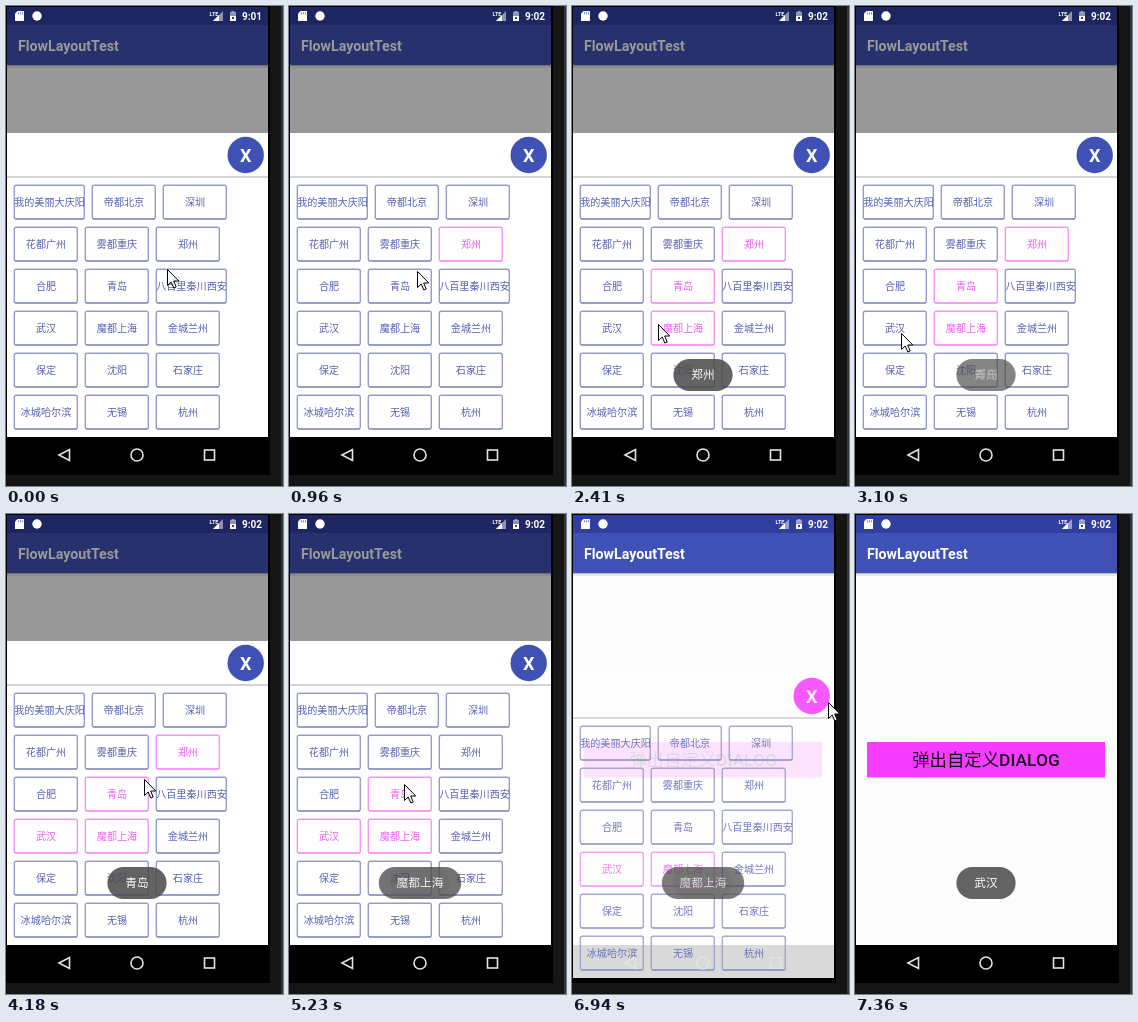
Animation, 277 px wide and 480 px high, one loop 7790 ms. Source, as an HTML page with a canvas:

```html
<!DOCTYPE html>
<html lang="zh-CN">
<head>
<meta charset="utf-8">
<title>FlowLayoutTest</title>
<style>
html, body { margin: 0; width: 100%; height: 100%; overflow: hidden; background: #151515; }
canvas { display: block; }
</style>
</head>
<body>
<canvas id="stage" width="277" height="480"></canvas>
<script>
const ctx = document.getElementById('stage').getContext('2d');
const LOOP = 7790, STEP = 133;
const FONT = 'Roboto, "Noto Sans CJK SC", "Noto Sans CJK", sans-serif';
const BLUE = '#3f51b5', PINK = '#f53cff';
const SCREEN = { x: 1, w: 261, nav: 431, bottom: 468 };
const CLOSE_AT = 6840;

// When each tag is picked, and dropped again
const PICKED = {
  郑州: [600, 4500], 青岛: [1250, 5450], 魔都上海: [2250], 武汉: [3300]
};

// Toasts queue up, each fading in while the one before fades out
const TOAST = { first: 970, every: 1965, fade: 320 };
const toasts = ['郑州', '青岛', '魔都上海', '武汉'];

// Pointer stops: arrival time, x, y
const STOPS = [
  [0, 161, 263], [500, 181, 238], [1110, 114, 272], [1600, 99, 315], [2800, 46, 327], [4350, 181, 236],
  [4750, 235, 212], [5187, 115, 270], [6300, 246, 147], [6700, 246, 147], [6916, 256, 188], [7150, 282, 222]
];
const MOVE = 600;

const clamp = v => Math.max(0, Math.min(1, v));
const ramp = (t, a, b) => clamp((t - a) / (b - a));
const smooth = k => k * k * (3 - 2 * k);
const mix = (a, b, k) => Math.round(a + (b - a) * k);

// Flow layout: fill a line, wrap when the next tag does not fit
function flow(names) {
  let x = 8, y = 179;
  return names.map(name => {
    const w = Math.max(64, name.length * 10 + 1);
    if (x + w > 255) { x = 8; y += 42; }
    const tag = { name, x, y, w };
    x += w + 7;
    return tag;
  });
}

const tags = flow(('我的美丽大庆阳 帝都北京 深圳 花都广州 雾都重庆 郑州 合肥 青岛 八百里秦川西安 ' +
  '武汉 魔都上海 金城兰州 保定 沈阳 石家庄 冰城哈尔滨 无锡 杭州').split(' '));

function rect(x, y, w, h, color) {
  ctx.fillStyle = color;
  ctx.fillRect(x, y, w, h);
}

function text(s, x, y, size, color, weight = 400, align = 'center') {
  ctx.font = `${weight} ${size}px ${FONT}`;
  ctx.textAlign = align;
  ctx.fillStyle = color;
  ctx.fillText(s, x, y);
}

function poly(points, fill, stroke, width = 1) {
  ctx.beginPath();
  points.forEach(([x, y]) => ctx.lineTo(x, y));
  ctx.closePath();
  if (fill) { ctx.fillStyle = fill; ctx.fill(); }
  if (stroke) { ctx.strokeStyle = stroke; ctx.lineWidth = width; ctx.stroke(); }
}

function disc(x, y, r, color) {
  ctx.beginPath();
  ctx.arc(x, y, r, 0, Math.PI * 2);
  ctx.fillStyle = color;
  ctx.fill();
}

function drawBezel() {
  rect(0, 0, 277, 480, '#151515');
  rect(0, 0, 264, 469, '#000');
  rect(275, 0, 2, 480, '#363636');
}

function drawPage(dim) {
  const { x, w, nav } = SCREEN;
  rect(x, 1, w, nav - 1, '#fcfcfc');
  rect(x, 59, w, 1, 'rgba(0,0,0,.25)');
  rect(x, 60, w, 2, 'rgba(0,0,0,.08)');
  rect(x, 1, w, 18, '#303f9f');
  rect(x, 19, w, 40, BLUE);
  text('FlowLayoutTest', 12, 45, 14.2, '#fff', 700, 'left');
  rect(12, 263, 238, 1.5, 'rgba(0,0,0,.2)');
  rect(12, 228, 238, 35, PINK);
  text('弹出自定义DIALOG', 131, 252, 17.4, '#1c1020', 500);
  if (dim) rect(x, 1, w, nav - 1, 'rgba(0,0,0,.4)');
}

function drawTag({ name, x, y, w }, t) {
  const [from, to] = PICKED[name] || [LOOP];
  const on = t >= from && !(t >= to);
  ctx.beginPath();
  ctx.roundRect(x + .3, y + .3, w - 1, 33.7, 2);
  ctx.strokeStyle = on ? '#f595f8' : '#959ccb';
  ctx.lineWidth = 1.4;
  ctx.stroke();
  rect(x + 1, y + 33.5, w - 2, 1, on ? 'rgba(240,90,245,.4)' : 'rgba(60,70,140,.4)');
  text(name, x + w / 2, y + 21.3, 10.1, on ? '#f45cfa' : '#5560b0');
}

function drawDialog(t) {
  const { x, w, nav, bottom } = SCREEN;
  const p = ramp(t, CLOSE_AT, CLOSE_AT + 220) ** 2;
  if (p >= 1) return;
  ctx.save();
  ctx.beginPath();
  ctx.rect(x, 1, w, bottom - 1);
  ctx.clip();
  ctx.translate(0, Math.round(277 * p));
  ctx.globalAlpha = clamp(1 - 1.25 * p);
  rect(x, 127, w, nav - 127, '#fff');
  rect(x, 170.5, w, 1, '#a8a8a8');
  disc(239.7, 149, 18.2, t >= 6550 ? PINK : BLUE);
  text('X', 239.7, 156, 18, '#fff', 700);
  tags.forEach(tag => drawTag(tag, t));
  ctx.restore();
}

function drawSystem(t) {
  poly([[11.5, 5], [18, 5], [18, 15], [9, 15], [9, 7.5]], '#fff');
  for (let x = 12; x < 17; x += 2) rect(x, 6.3, .8, 2, '#56619a');
  disc(31, 10, 4.7, '#fff');
  text('LTE', 208, 9.5, 5.5, '#fff', 700);
  poly([[217, 5], [217, 15], [207, 15]], 'rgba(255,255,255,.5)');
  poly([[213, 9], [213, 15], [207, 15]], '#fff');
  rect(225.5, 5, 3, 1.5, 'rgba(255,255,255,.5)');
  rect(224, 6, 6, 4, 'rgba(255,255,255,.5)');
  rect(224, 10, 6, 5, '#fff');
  rect(226, 11, 2, 2, '#303f9f');
  text(t < 600 ? '9:01' : '9:02', 256, 14, 10, '#fff', 700, 'right');

  poly([[53, 449], [63.5, 443.5], [63.5, 454.5]], null, '#e4e4e4', 1.6);
  ctx.beginPath();
  ctx.arc(131, 449, 6, 0, Math.PI * 2);
  ctx.stroke();
  ctx.strokeRect(198.5, 444, 10, 10);
}

function drawToast(s, i, t) {
  const start = TOAST.first + TOAST.every * i, end = start + TOAST.every;
  const alpha = ramp(t, start, start + TOAST.fade) * (1 - ramp(t, end, end + TOAST.fade));
  if (!alpha) return;
  const w = 36 + 11.6 * s.length;
  ctx.save();
  ctx.globalAlpha = alpha;
  ctx.beginPath();
  ctx.roundRect(131 - w / 2, 353, w, 32, 16);
  ctx.fillStyle = 'rgba(78,78,78,.88)';
  ctx.fill();
  text(s, 131, 373.3, 11.7, '#fff');
  ctx.restore();
}

function drawPointer(t) {
  const i = STOPS.findIndex(stop => stop[0] > t);
  if (i < 0) return;
  const [t0, x0, y0] = STOPS[i - 1], [t1, x1, y1] = STOPS[i];
  const k = smooth(ramp(t, Math.max(t0, t1 - MOVE), t1));
  ctx.save();
  ctx.translate(mix(x0, x1, k) + .5, mix(y0, y1, k) + .5);
  poly([[0, 0], [0, 16], [3.7, 12.5], [6.3, 18.5], [8.7, 17.5], [6.2, 11.5], [11.3, 11.5]], '#fff', '#000');
  ctx.restore();
}

function draw(now) {
  const raw = now % LOOP, t = raw - raw % STEP;
  drawBezel();
  drawPage(t < CLOSE_AT);
  drawDialog(t);
  drawSystem(t);
  toasts.forEach((s, i) => drawToast(s, i, t));
  drawPointer(t);
}

const begin = performance.now();
function loop() {
  draw(performance.now() - begin);
  requestAnimationFrame(loop);
}
loop();
</script>
</body>
</html>
```
